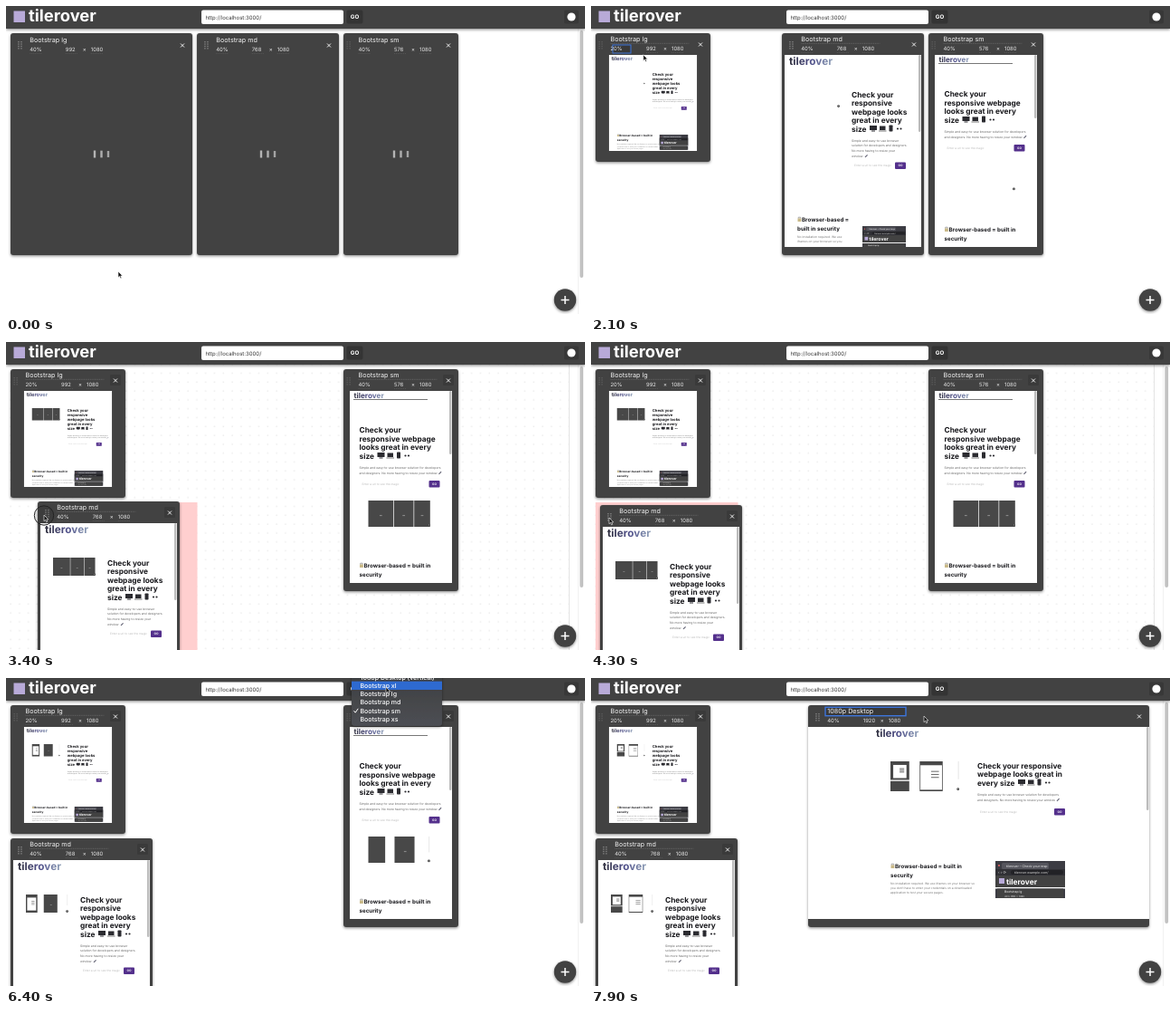
Recreate the animation shown at these times as an HTML page. Size 640 px wide and 340 px high, loop 8000 ms.

```html
<!DOCTYPE html>
<html lang="en">
<head>
<meta charset="utf-8">
<title>Responsive preview</title>
<style>
html, body { margin: 0; width: 640px; height: 340px; overflow: hidden; background: #fff; }
svg { display: block; font-family: Inter, "Open Sans", sans-serif; text-rendering: geometricPrecision; }
</style>
</head>
<body>
<svg id="stage" width="640" height="340" viewBox="0 0 640 340">
  <defs>
    <filter id="shadow" x="-10%" y="-10%" width="120%" height="125%">
      <feDropShadow dx="0" dy="1.2" stdDeviation="1.5" flood-opacity=".45"/>
    </filter>
    <linearGradient id="brand">
      <stop offset="0" stop-color="#2e2e3c"/><stop offset=".5" stop-color="#50508a"/><stop offset="1" stop-color="#8fa0b8"/>
    </linearGradient>
    <linearGradient id="menuFill" x2="0" y2="1">
      <stop offset="0" stop-color="#3c3d40"/><stop offset="1" stop-color="#4d4f54"/>
    </linearGradient>
    <pattern id="dots" width="9.8" height="9.8" patternUnits="userSpaceOnUse">
      <circle cx="5" cy="5" r=".55" fill="#cfcfcf"/>
    </pattern>
    <clipPath id="menuClip"><rect x="382" y="-6" width="100" height="59" rx="3"/></clipPath>
  </defs>
  <g id="scene"></g>
</svg>
<script>
const LOOP = 8000, STEP = 100;
const DARK = '#424242', BRAND = 'tilerover', BLUE = '#3d75dc';
const scene = document.getElementById('scene');

const rect = (x, y, w, h, fill, extra = '') =>
  `<rect x="${x}" y="${y}" width="${w}" height="${h}" fill="${fill}" ${extra}/>`;
const circle = (x, y, r, fill, extra = '') =>
  `<circle cx="${x}" cy="${y}" r="${r}" fill="${fill}" ${extra}/>`;
const text = (x, y, size, fill, str, extra = '') =>
  `<text x="${x}" y="${y}" font-size="${size}" fill="${fill}" ${extra}>${str}</text>`;
const line = (d, stroke, width, extra = '') =>
  `<path d="${d}" fill="none" stroke="${stroke}" stroke-width="${width}" ${extra}/>`;
const group = (x, y, body, scale = 1) =>
  `<g transform="translate(${x} ${y}) scale(${scale})">${body}</g>`;
const bold = 'font-weight="700"';
const lines = (rows, x, y, gap, size, fill, extra) =>
  rows.map((row, i) => text(x, y + i * gap, size, fill, row, extra)).join('');

// Keys are [time, ...values]; values ease between neighbouring keys.
function track(keys, t) {
  const next = keys.findIndex(k => k[0] > t);
  if (next < 0) return keys[keys.length - 1].slice(1);
  if (next === 0) return keys[0].slice(1);
  const a = keys[next - 1], b = keys[next];
  const p = (t - a[0]) / (b[0] - a[0]), e = p * p * (3 - 2 * p);
  return a.slice(1).map((v, i) => v + (b[i + 1] - v) * e);
}
const hold = (keys, t) => keys.filter(k => k[0] <= t).pop().slice(1);

const CURSOR = [[0, 124, 293], [400, 122, 288], [1200, 39, 55], [2000, 39, 55], [2500, 220, 43],
  [2650, 220, 43], [2900, 152, 110], [3400, 42, 191], [3900, 20, 194], [4700, 20, 194],
  [5500, 401, 36], [5900, 401, 36], [6400, 420, 10], [6800, 420, 7], [7300, 420, 7], [7900, 368, 42]];
const DRAG = [[2650, 211, 30], [2900, 152, 73], [3400, 35, 176], [3900, 10, 180], [4500, 10, 180], [4600, 5, 177]];
const SLOT = [[0, 211, 30], [2800, 187, 30], [2900, 163, 30], [3100, 113, 30], [3200, 84, 177],
  [3400, 54, 177], [3600, 30, 177], [3800, 5, 177]];

const INTRO = {
  narrow: ['Simple and easy-to-use browser', 'solution for developers and designers.', 'No more having to resize your', 'window'],
  wide: ['Simple and easy-to-use browser solution for developers', 'and designers. No more having to resize your window']
};
const DETAILS = ['No installation required. We use iframes on your browser so',
  "you don't have to enter your credentials on a downloaded", 'application to test your secure pages.'];
const NARROW_HEAD = ['Check your', 'responsive', 'webpage looks', 'great in every', 'size'];
const WIDE_FEATURE = ['Browser-based = built in', 'security'];

// Page layouts in the units of a 40% view.
const PAGES = {
  lg: { w: 195, logo: [6, 11.5, 11.5], head: [96, 46], gap: 10, rows: NARROW_HEAD, intro: INTRO.wide, introY: 99,
    form: [96, 114, 160], preview: [18, 38, 62, 27], feature: [18, 180], featureRows: WIDE_FEATURE, shot: [112, 176, 63, 35] },
  md: { w: 151, logo: [5, 11, 11.8], head: [74, 46.5], rows: NARROW_HEAD, intro: INTRO.narrow, introY: 95.5,
    form: [74, 118.5, 122], preview: [14, 38, 47, 20], feature: [14, 184], featureRows: ['Browser-based =', 'built in security'],
    shot: [86, 189, 48, 24], bar: 85 },
  sm: { w: 113, logo: [4.5, 7.5, 8.2], rule: 82, head: [10.5, 46], rows: ['Check your', 'responsive webpage', 'looks great in every', 'size'],
    intro: INTRO.wide, introY: 86, form: [10.5, 99, 87.5], preview: [20.5, 121, 69, 29], feature: [10.5, 195], featureRows: WIDE_FEATURE, bar: 70 },
  xl: { w: 377, logo: [75, 10.5, 11.6], head: [187, 45.5], rows: ['Check your responsive', 'webpage looks great in', 'every size'],
    intro: INTRO.wide, introY: 76, form: [187, 90, 272], preview: [91, 38, 77, 33], feature: [91, 156], featureRows: WIDE_FEATURE,
    shot: [207, 148, 77, 41], bar: 92, wide: true }
};
const PAGE_H = 212;

function devices(x, y) {
  const ink = '#2b2b30';
  return rect(x, y - 6.5, 8, 5, ink) + rect(x + 2, y - 1, 4, 1, ink) +
    rect(x + 11, y - 6, 6.5, 4.5, ink) + rect(x + 10, y - 1, 8.5, 1, '#777') +
    rect(x + 21.5, y - 7, 4, 7, ink, 'rx=".7"') +
    circle(x + 31, y - 3, 1.1, ink) + circle(x + 34.5, y - 3, 1.1, ink);
}

function miniature([x, y, w, h], t) {
  const part = (fill, a, b, top = 0, bottom = 1) => rect(x + w * a, y + h * top, w * (b - a), h * (bottom - top), fill);
  const box = (...area) => part('#484848', ...area);
  const white = (...area) => part('#fff', ...area);
  const speck = a => part('#888', a, a + .04, .55, .59);
  const marks = (a, b, top, bottom) => [.25, .38, .51].map(row => {
    const rowTop = top + (bottom - top) * row;
    return part('#666', a + (b - a) * .48, a + (b - a) * .83, rowTop, rowTop + .03);
  }).join('');
  const dot = circle(x + w * .97, y + h * .93, 1.4, '#444') + circle(x + w * .97, y + h * .93, .4, '#fff');
  const bar = part('#ddd', .97, .98, 0, .6);
  if (t < 3000) return dot;
  if (t < 4800) return [[0, .4], [.41, .725], [.735, .99]].map(([a, b]) => box(a, b) + speck((a + b) / 2 - .02)).join('') + dot;
  if (t < 6900) {
    const loaded = t > 5900 && w < 65;
    return box(0, .27) + (loaded ? white(.03, .24, .17, .88) + marks(.03, .24, .17, .88) : '') +
      box(.42, .74) + speck(.57) + bar + dot;
  }
  return box(0, .27, 0, .62) + white(.04, .23, .12, .56) + marks(.04, .23, .12, .56) + box(0, .27, .66, 1) +
    box(.42, .75) + white(.43, .74, .13, .95) + marks(.43, .75, .13, .9) + bar + dot;
}

function screenshot([x, y, w]) {
  return group(x, y, rect(0, 0, 77, 41, '#3c3c43') + rect(7, 2, 52, 7, '#55555d', 'rx="1.5"') +
    circle(4, 5, 1, '#e66') + text(12, 7, 3.6, '#eee', `${BRAND} – Check your resp`) +
    rect(0, 9, 77, 7, '#303035') + text(3, 14, 4.2, '#ddd', '‹ › ⟳') +
    rect(17, 10, 58, 5, '#222226', 'rx="2.5"') + text(21, 13.8, 3.5, '#ddd', `${BRAND}.example.com/`) +
    rect(0, 16, 77, 13, DARK) + rect(4, 19, 6, 6, '#b8aad8') + text(12, 25.5, 8.4, '#fff', BRAND, bold) +
    rect(0, 29, 77, 1.5, '#fff') + rect(2, 30.5, 73, 10.5, DARK) + text(10, 35, 3.4, '#fff', 'Bootstrap lg') +
    text(10, 39.5, 2.8, '#ddd', '40%  992 × 1080'), w / 77);
}

function page(kind, t) {
  const p = PAGES[kind], [hx, hy] = p.head, [fx, fy, bx] = p.form, [sx, sy] = p.feature;
  const gap = p.gap || 9.5, lastY = hy + (p.rows.length - 1) * gap;
  const introEnd = p.introY + (p.intro.length - 1) * 5.8;
  let out = rect(0, 0, p.w, PAGE_H, '#fff');
  out += text(p.logo[0], p.logo[1], p.logo[2], 'url(#brand)', BRAND, bold);
  if (p.rule) out += rect(4, 9, p.rule, 1, '#777');
  out += lines(p.rows, hx, hy, gap, 8.3, '#18181c', bold);
  out += devices(hx + (p.wide ? 45 : 20), lastY);
  out += lines(p.intro, hx, p.introY, 5.8, 3.4, '#666');
  out += line(`M${hx + (kind === 'md' ? 15 : 88)} ${introEnd} l2.6 -2.6`, '#667', 1.2);
  out += text(fx + 3, fy + 4.5, 3.2, '#bbb', 'Enter a url to see the magic');
  out += rect(bx, fy, 12, 7.5, '#54308c', 'rx="1"') + text(bx + 6, fy + 4.9, 3.3, '#fff', 'GO', `${bold} text-anchor="middle"`);
  out += miniature(p.preview, t);
  out += rect(sx + .5, sy - 3.6, 3.8, 3.6, '#c9b987') + line(`M${sx + 1.2} ${sy - 3.6} v-1.2 h2.4 v1.2`, '#888', .7);
  out += text(sx + 5, sy, 6.2, '#18181c', p.featureRows[0], bold) + text(sx, sy + 9.5, 6.2, '#18181c', p.featureRows[1], bold);
  if (p.shot) {
    const rows = kind === 'md' ? ['No installation required. We use', 'iframes on your browser so you'] : DETAILS;
    out += lines(rows, sx, sy + 18, 5, 3.3, '#777') + screenshot(p.shot);
  }
  if (p.bar) out += rect(p.w - 3, 0, 2.4, p.bar, '#bcbcbc', 'rx="1.2"');
  return `<svg width="${p.w}" height="${PAGE_H}" viewBox="0 0 ${p.w} ${PAGE_H}">${out}</svg>`;
}

function loader(cx, cy, t) {
  return [-1, 0, 1].map(i => {
    const wave = .5 + .5 * Math.cos(t / 1000 * 2 * Math.PI - (i + 1) * .8);
    const h = 6 + 2 * wave;
    return rect(cx + i * 7.5 - 1.2, cy - h / 2, 2.4, h, '#b5b5b5', `opacity="${.7 + .3 * wave}"`);
  }).join('');
}

function panel(o, t) {
  const { x, y, w, h, zoom = 1 } = o;
  const dx = w < 130 ? 16.5 : 21.3, top = o.loading ? 1 : 0;
  let out = rect(0, 0, w, h, DARK, 'rx="3" filter="url(#shadow)"');
  for (let i = 0; i < 8; i++) {
    out += rect(dx - 13 + (i % 2) * 3, 9 + (i >> 1) * 2.4, 1.3, 1.3, w < 130 ? '#5d5d5d' : '#8a8a8a');
  }
  if (o.selecting) out += rect(19, 2.3, 89, 9.4, '#393939', `stroke="${BLUE}" stroke-width="1.4"`);
  out += text(dx, 9.4 + top, 7.2, '#f4f4f4', o.title);
  if (!o.loading && !o.selecting) out += line(`M${dx} 11.3 h87`, '#777', .6, 'stroke-dasharray="1 .7"');
  if (o.editing) out += rect(19, 13, 20, 9, '#393939', `stroke="${BLUE}" stroke-width="1"`);
  const fields = [[0, o.percent], [39.5, o.size], [67.5, '1080']];
  fields.forEach(([fx, value]) => {
    out += text(dx + fx, 19.3 + top, 5.9, '#e8e8e8', value) +
      line(`M${dx + fx} ${21.5 + top} h14`, '#666', .5, 'stroke-dasharray="1 1"');
  });
  out += text(dx + 58.5, 19.2 + top, 6, '#eee', '×');
  if (!o.loading && !o.selecting && t > 2500) out += rect(w - 17, 6, 12, 12, '#3a3a3a', 'rx="1.5"');
  out += line(`M${w - 13} ${10.5 + top} l4 4 m0 -4 l-4 4`, '#eee', 1);
  if (o.loading) out += loader(w / 2, 133.5, t);
  else if (o.ready) out += group((w - PAGES[o.kind].w * zoom) / 2, 24, page(o.kind, t), zoom);
  return group(x, y, out);
}

function header() {
  return rect(0, -4, 640, 29, DARK, 'filter="url(#shadow)"') + rect(8.5, 5.5, 12.5, 12.5, '#b8aad8') +
    text(25, 17, 18.4, '#fff', BRAND, bold) +
    rect(216, 4.5, 157, 15.5, '#fff', 'rx="2"') + text(220.5, 14.5, 6, '#333', 'http://localhost:3000/') +
    rect(376.5, 4.5, 18, 15, '#343434', 'rx="2"') + text(385.5, 14.2, 6.2, '#fff', 'GO', `${bold} text-anchor="middle"`) +
    rect(617, 4.5, 16, 15, '#383838', 'rx="2"') + circle(625, 12, 4.6, '#fff');
}

const MENU = ['Bootstrap xs', 'Bootstrap sm', 'Bootstrap md', 'Bootstrap lg', 'Bootstrap xl',
  '1080p Desktop (vertical)', '1080p Desktop', '720p Desktop'];
function menu(t, cy) {
  const [scroll] = track([[6500, 0], [6800, 18.6]], t);
  const rowY = i => 45.5 + scroll - i * 9.3;
  const active = Math.max(0, Math.round((45.5 + scroll - cy) / 9.3));
  let out = rect(382, -6, 100, 59, 'url(#menuFill)', 'rx="3"');
  out += rect(382, rowY(active) - 4.6, 100, 9.3, '#2f6bd0');
  MENU.forEach((name, i) => { out += text(391.5, rowY(i) + 2.5, 7, '#fff', name, 'font-weight="500"'); });
  out += line(`M384.5 ${rowY(1)} l1.7 2 l3 -4.4`, '#fff', 1);
  return `<g filter="url(#shadow)"><g clip-path="url(#menuClip)">${out}</g></g>`;
}

function render(t) {
  const [cx, cy] = track(CURSOR, t);
  const [mx, my] = track(DRAG, t);
  const [slotX, slotY] = hold(SLOT, t);
  const [lgW, lgH, lgZoom] = track([[1800, 201, 245, 1], [2000, 127, 142, .5]], t);
  const [smX, smW] = track([[7300, 373, 127], [7500, 240, 377]], t);
  const dragging = t >= 2700 && t < 4600, large = t >= 7400;
  let out = rect(0, 0, 640, 340, '#fff');

  if (dragging) {
    const bottom = slotY > 100 ? 341 : 279;
    out += rect(0, 25, 622.5, bottom - 25, 'url(#dots)') + line(`M622.5 25 V${bottom} H0`, '#ddd', .8);
    out += rect(slotX, slotY, 157.5, 245, '#ffcfcf');
  }
  const bar = t < 900 ? 300 : t >= 3200 ? 271 : 0;
  if (bar) out += line('M632.5 25 V340', '#eee', .8) + rect(634.3, 27, 3.8, bar - 27, '#c2c2c2', 'rx="1.9"');

  const lg = panel({ kind: 'lg', x: 5, y: 30, w: lgW, h: lgH, zoom: lgZoom, title: 'Bootstrap lg', size: '992',
    percent: t < 1700 ? '40%' : '20%', editing: t >= 1300 && t < 2400, loading: t < 1100, ready: t >= 1700 }, t);
  const md = panel({ kind: 'md', x: mx, y: my, w: 157, h: 245, title: 'Bootstrap md', size: '768',
    percent: '40%', loading: t < 1200, ready: t >= 1700 }, t);
  const sm = panel({ kind: large ? 'xl' : 'sm', x: smX, y: 30, w: smW, h: 245, title: large ? '1080p Desktop' : 'Bootstrap sm',
    size: large ? '1920' : '576', percent: '40%', loading: t < 1700, ready: t >= 1900, selecting: large }, t);
  out += lg + sm + md + header();

  out += circle(618, 324.5, 12.2, DARK, 'filter="url(#shadow)"') + line('M613.5 324.5 h9 M618 320 v9', '#fff', 1.5);
  if (t >= 5900 && t < 7300) out += menu(t, cy);
  if (t >= 2700 && t < 4100) out += circle(cx, cy + .5, 10.7, 'rgba(0,0,0,.08)', 'stroke="#222" stroke-width="1"');
  out += group(cx, cy, '<path d="M0 0 V6.7 L1.5 5.3 L2.6 7.8 L3.8 7.3 L2.7 4.9 H4.8 Z" fill="#111" stroke="#fff" stroke-width=".6"/>');
  scene.innerHTML = out;
}

let shown = -1;
function frame() {
  const t = Math.floor(performance.now() % LOOP / STEP) * STEP;
  if (t !== shown) render(shown = t);
  requestAnimationFrame(frame);
}
frame();
</script>
</body>
</html>
```
